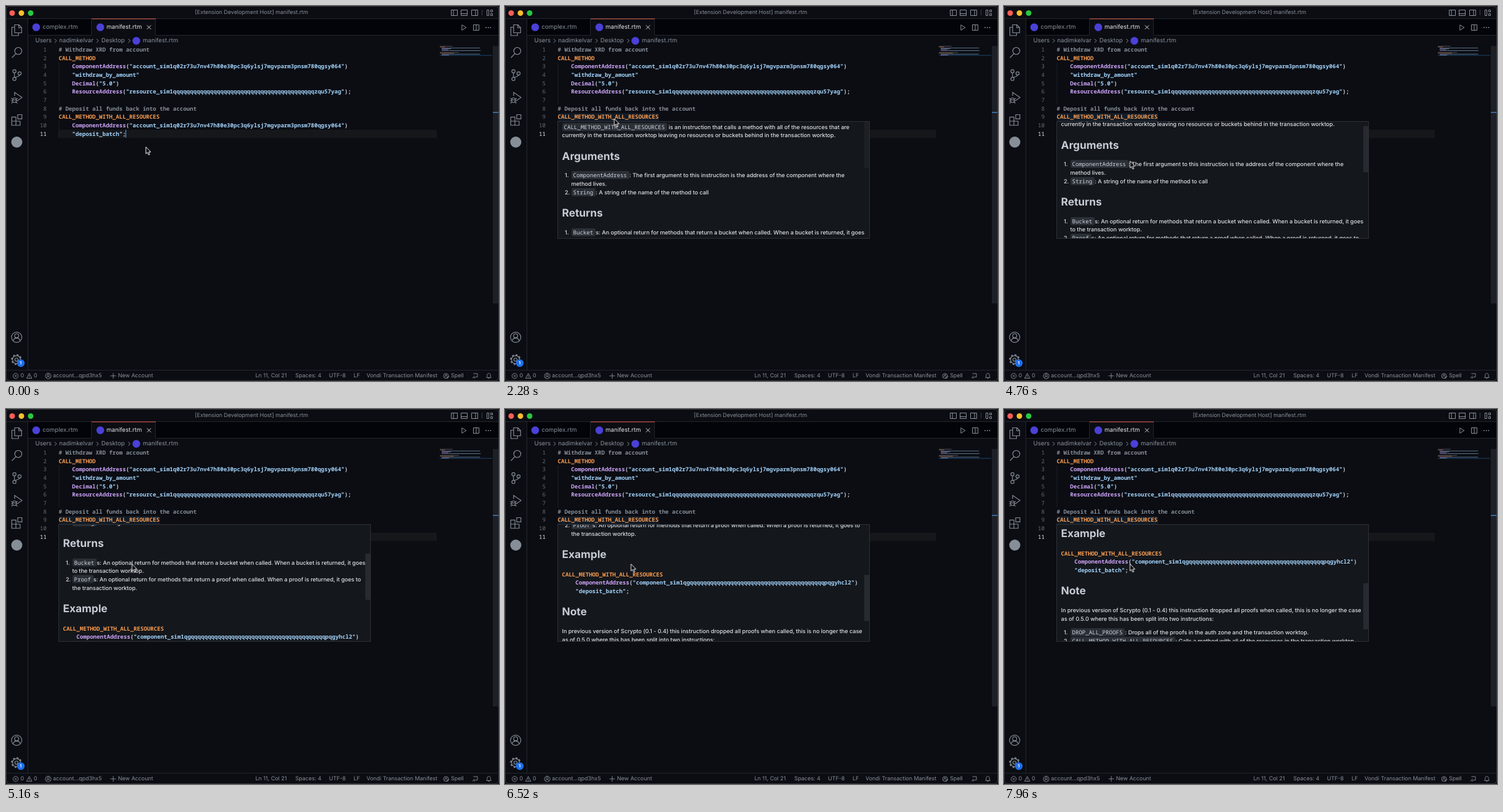
An HTML page that plays this animation: 800 by 609 pixels, repeating every 8000 ms.

```html
<!DOCTYPE html>
<html lang="en">
<head>
<meta charset="utf-8">
<title>Editor hover</title>
<style>
html, body { margin: 0; width: 100%; height: 100%; overflow: hidden; background: #0b0d13; }
#stage { position: relative; width: 800px; height: 609px; overflow: hidden; background: #0b0d13; text-rendering: geometricPrecision; -webkit-font-smoothing: antialiased; }
#stage::after { content: ""; position: absolute; inset: 0; border-radius: 6px; box-shadow: inset 0 0 0 1px #34373d; }
svg { position: absolute; left: 0; top: 0; overflow: visible; }
.t { position: absolute; white-space: pre; font: 8.95px/14px Inter, sans-serif; color: #8a919b; }
.nav { font-size: 9.7px; }
.on { color: #e3e7ec; }
.mono, code { font: 600 9.1px/14px "Noto Sans Mono", monospace; color: #ced5dd; }
.num { font-weight: 500; color: #626973; }
.num.on { color: #dfe4ea; }
.doc { font-size: 9.1px; font-weight: 450; letter-spacing: -.035px; color: #dde2e7; }
.head { font-size: 17.3px; font-weight: 700; color: #c6ccd4; }
code { font-weight: 500; background: #2b2f36; border-radius: 2.5px; padding: 0 4px 0 3px; letter-spacing: 0; line-height: 1; }
#tip { position: absolute; left: 85px; top: 187px; width: 505px; height: 189px; border: 1px solid #2d3138; background: #14171c; overflow: hidden; visibility: hidden; }
#doc { position: absolute; left: -86px; top: -188px; }
#thumb { position: absolute; right: 0; top: 0; width: 8px; height: 75px; background: #272b31; }
#caret { position: absolute; left: 194px; top: 201px; width: 1.3px; height: 13px; background: #58a6ff; }
#word { position: absolute; left: 85.5px; top: 173.5px; width: 164px; height: 13.5px; background: #121c28; visibility: hidden; }
</style>
</head>
<body>
<div id="stage">
  <svg width="800" height="609" fill="none">
    <path fill="#020409" d="M36 21H800V47H36Z"/>
    <path fill="#0b0d13" d="M139 21H243V48H139Z"/>
    <path stroke="#22262d" d="M0 20.5H800M35.5 21V591M36 47.5H139M243 47.5H800M138.5 21V47M242.5 21V47M0 591.5H800"/>
    <path stroke="#e8604f" d="M139 20.9H243"/>
    <path fill="#15171b" d="M85 201H699V214.5H85Z"/>
    <path stroke="#1d2128" d="M86 92V160M86 187V214"/>
    <path fill="#1d2026" d="M790 65H800V483H790Z"/>
    <path stroke="#4487c4" stroke-width="1.4" d="M790 172.8H800"/>
    <path fill="#17324f" d="M704 79.4H789V80.9H704Z"/>
    <g id="map" opacity=".55"></g>

    <circle cx="10" cy="11.5" r="4.5" fill="#fe5f57"/>
    <circle cx="25" cy="11.5" r="4.5" fill="#febc2e"/>
    <circle cx="40" cy="11.5" r="4.5" fill="#28c840"/>
    <g fill="#4b40d8"><circle cx="49" cy="34.5" r="6.3"/><circle cx="153" cy="34.5" r="6.3"/><circle cx="211.5" cy="56.5" r="6.3"/></g>

    <g stroke="#868e98" stroke-width="1.15">
      <path d="M14 30.5H21L25.3 35V43.5H14ZM20.7 30.5V35.2H25.3M14 34.5H9.5V48H20.3V43.5"/>
      <path d="M16 77.3L9.7 84M25.6 73A5.7 5.7 0 1 0 14.2 73A5.7 5.7 0 1 0 25.6 73"/>
      <g><circle cx="13.7" cy="106" r="2.6"/><circle cx="13.7" cy="118.4" r="2.6"/><circle cx="22" cy="109.5" r="2.6"/><path d="M13.7 108.6V115.8M22 112.1C22 115 18 114.6 15 116"/></g>
      <path d="M14 146V140.3L26 148.6L18.5 153.8M10.6 153A3 3.6 0 1 0 16.8 153A3 3.6 0 1 0 10.6 153M10.6 152.5H16.8M8.5 150L11 151.3M19 150L16.4 151.3M8.2 154H10.6M16.8 154H19.2M9 158L11.2 155.8M18.4 158L16.2 155.8"/>
      <path d="M9.3 180.3H16.1V193.7H9.3ZM9.3 187H22.9V193.7H16.1M19 176.5H25.8V183.3H19Z"/>
      <circle cx="17.3" cy="538" r="8.4"/><circle cx="17.3" cy="535.5" r="3.3"/><path d="M11.6 544C12.5 537.8 22.1 537.8 23 544"/>
      <circle cx="17" cy="574.3" r="6.4"/><circle cx="17" cy="574.3" r="2.6"/><circle cx="17" cy="574.3" r="7.8" stroke-width="1.8" stroke-dasharray="3.1 3.026"/>
    </g>
    <circle cx="17.5" cy="221" r="9" fill="#868e98"/>
    <circle cx="24" cy="580" r="6.2" fill="#1f6feb"/>

    <g stroke="#8a919b">
      <path d="M722.5 6.5H732.5V15.5H722.5ZM726 6.5V15.5M738.5 6.5H748.5V15.5H738.5ZM738.5 12.5H748.5M755.5 6.5H765.5V15.5H755.5ZM762 6.5V15.5M780.5 6.5H783.5V15.5H780.5ZM786.5 6.5H789.5V9.5H786.5ZM786.5 12.5H789.5V15.5H786.5Z"/>
      <path stroke="#3a3f47" d="M772.5 6V15"/>
      <path d="M739.8 30.7V39.3L746.8 35ZM758.5 30.5H767.5V39.5H758.5ZM763 30.5V39.5"/>
      <path stroke="#d5dae0" d="M228.8 31.3L235.2 37.7M235.2 31.3L228.8 37.7"/>
      <path d="M79 53.5L82 56.5L79 59.5M147 53.5L150 56.5L147 59.5M198.5 53.5L201.5 56.5L198.5 59.5"/>
      <g stroke-width=".9">
        <circle cx="15.7" cy="600.8" r="4.2"/><path d="M14 599.1L17.4 602.5M17.4 599.1L14 602.5"/>
        <path d="M37.7 596.6L42 604.6H33.4ZM37.7 599.5V602M37.7 602.8V603.6"/>
        <circle cx="68.5" cy="600.8" r="4.6"/><circle cx="68.5" cy="599.5" r="1.8"/><path d="M65.4 604C66 600.9 71 600.9 71.6 604M169.5 600.7H178.5M174 596.2V605.2"/>
        <circle cx="714" cy="600.8" r="3.9"/><path d="M712 602.5L714 598.5L716 602.5M715 603L716.5 604.6L719 601"/>
        <path d="M758.5 597H765V602.5H762L760 604.5V602.5M757 604.5L760.5 600.5"/>
        <path d="M779.8 603.4H787.2L786.2 601.5V599.5C786.2 595.6 780.8 595.6 780.8 599.5V601.5ZM782.3 603.6C782.5 605.4 784.5 605.4 784.7 603.6"/>
      </g>
    </g>
    <g fill="#8a919b"><circle cx="779" cy="35" r=".9"/><circle cx="782.7" cy="35" r=".9"/><circle cx="786.4" cy="35" r=".9"/></g>
  </svg>
  <div id="word"></div>
  <div id="text"></div>
  <div id="caret"></div>
  <div id="tip"><div id="doc"></div><div id="thumb"></div></div>
  <svg id="pointer" width="10" height="15"><path d="M0 0V11.2L2.5 8.9L4.3 13L6.2 12.2L4.4 8.2H7.9Z" fill="#000" stroke="#fff" stroke-width="1"/></svg>
</div>
<script>
const $ = id => document.getElementById(id);
const LINE = 13.65, CHAR = 5.46, LOOP = 8000;
const COLORS = { comment: '#868d97', keyword: '#f99c50', type: '#cda4f8', string: '#a3d3fb', plain: '#ced5dd' };

const account = 'account_sim1q02r73u7nv47h80e30pc3q6ylsj7mgvparm3pnsm780qgsy064';
const source = [
  '# Withdraw XRD from account',
  'CALL_METHOD',
  `    ComponentAddress("${account}")`,
  '    "withdraw_by_amount"',
  '    Decimal("5.0")',
  `    ResourceAddress("resource_sim1${'q'.repeat(42)}zqu57yag");`,
  '',
  '# Deposit all funds back into the account',
  'CALL_METHOD_WITH_ALL_RESOURCES',
  `    ComponentAddress("${account}")`,
  '    "deposit_batch";'
];

function tokens(line) {
  const rule = /(?<comment>#.*)|(?<string>"[^"]*")|(?<keyword>[A-Z]+_[A-Z_]+)|(?<type>[A-Z]\w+)|(?<plain>[^"A-Z#]+)/g;
  return [...line.matchAll(rule)].map(m => ({
    text: m[0], at: m.index, color: COLORS[Object.keys(m.groups).find(k => m.groups[k])]
  }));
}
const paint = line => tokens(line).map(k => `<span style="color:${k.color}">${k.text}</span>`).join('');

// Places one line of text by its left edge and vertical middle.
function put(parent, x, middle, html, cls = '') {
  const el = document.createElement('div');
  el.className = 't ' + cls;
  el.style.left = x + 'px';
  el.style.top = middle - 7 + 'px';
  el.innerHTML = html;
  parent.append(el);
}

source.forEach((line, i) => {
  const y = 71 + LINE * i, n = String(i + 1);
  put($('text'), 66 - n.length * CHAR, y, n, 'mono num' + (i === 10 ? ' on' : ''));
  put($('text'), 85.5, y, paint(line), 'mono');
  $('map').innerHTML += tokens(line).filter(k => k.text.trim()).map(k =>
    `<rect x="${704 + k.at * .76}" y="${64.8 + i * 1.43}" width="${k.text.length * .76}" height=".95" fill="${k.color}"/>`).join('');
});

[
  [306.5, 10.8, '[Extension Development Host] manifest.rtm'],
  [59.5, 34.5, 'complex.rtm', 'nav'],
  [163, 34.5, 'manifest.rtm', 'nav on'],
  [47.5, 56.5, 'Users', 'nav'],
  [86.3, 56.5, 'nadimkelvar', 'nav'],
  [154.8, 56.5, 'Desktop', 'nav'],
  [222, 56.5, 'manifest.rtm', 'nav'],
  [23.5, 600.8, '0'],
  [45, 600.8, '0'],
  [76.3, 600.8, 'account...qpd3hx5'],
  [181.8, 600.8, 'New Account'],
  [404.7, 600.8, 'Ln 11, Col 21'],
  [469.5, 600.8, 'Spaces: 4'],
  [524, 600.8, 'UTF-8'],
  [564, 600.8, 'LF'],
  [585, 600.8, 'Vondi Transaction Manifest'],
  [722, 600.8, 'Spell'],
  [22.3, 580, '<b style="font-size:7px;color:#fff">1</b>']
].forEach(row => put($('text'), ...row));

const say = (x, y, html) => put($('doc'), x, y, html, 'doc');
const item = (n, y, html) => { say(97, y, n + '.'); say(107.5, y, html); };
const head = (y, text) => put($('doc'), 92.5, y, text, 'head');

say(92.5, 197.5, '<code>CALL_METHOD_WITH_ALL_RESOURCES</code> is an instruction that calls a method with all of the resources that are');
say(92.5, 211, 'currently in the transaction worktop leaving no resources or buckets behind in the transaction worktop.');
head(244.5, 'Arguments');
item(1, 276, '<code>ComponentAddress</code>: The first argument to this instruction is the address of the component where the');
say(107.5, 290, 'method lives.');
item(2, 303.5, '<code>String</code>: A string of the name of the method to call');
head(337, 'Returns');
item(1, 368.5, '<code>Bucket</code>s: An optional return for methods that return a bucket when called. When a bucket is returned, it goes');
say(107.5, 382, 'to the transaction worktop.');
item(2, 396, '<code>Proof</code>s: An optional return for methods that return a proof when called. When a proof is returned, it goes to');
say(107.5, 409.5, 'the transaction worktop.');
head(443, 'Example');
[
  'CALL_METHOD_WITH_ALL_RESOURCES',
  `    ComponentAddress("component_sim1qg${'q'.repeat(40)}pqgyhcl2")`,
  '    "deposit_batch";'
].forEach((line, i) => put($('doc'), 92.5, 474.6 + LINE * i, paint(line), 'mono'));
head(536, 'Note');
say(92.5, 568, 'In previous version of Scrypto (0.1 - 0.4) this instruction dropped all proofs when called, this is no longer the case');
say(92.5, 581.5, 'as of 0.5.0 where this has been split into two instructions:');
item(1, 604, '<code>DROP_ALL_PROOFS</code>: Drops all of the proofs in the auth zone and the transaction worktop.');
item(2, 617.6, '<code>CALL_METHOD_WITH_ALL_RESOURCES</code>: Calls a method with all of the resources in the transaction worktop.');

function play(el, steps, easing, duration = LOOP) {
  const frames = steps.map(([t, style]) => ({ offset: t / duration, easing, ...style }));
  frames.push({ ...frames[frames.length - 1], offset: 1 });
  el.animate(frames, { duration, iterations: Infinity });
}
const move = (x, y) => ({ transform: `translate(${x}px, ${y}px)` });
const show = v => ({ visibility: v ? 'visible' : 'hidden' });

play($('pointer'), [
  [0, move(227, 228.8)], [700, move(227, 228.8)], [1400, move(177.3, 183)],
  [2600, move(177.3, 183)], [3300, move(204.5, 251.8)]
], 'ease-in-out');
play($('caret'), [[0, { opacity: 1 }], [500, { opacity: 0 }]], 'steps(1, end)', 1000);
for (const id of ['tip', 'word']) play($(id), [[0, show(false)], [1720, show(true)]], 'steps(1, end)');

const scroll = [[0, 0], [4400, 0], [4740, 18], [4840, 18], [5450, 159], [5900, 159], [6400, 206], [7000, 206], [7600, 240]];
play($('doc'), scroll.map(([t, y]) => [t, move(0, -y)]), 'ease-out');
play($('thumb'), scroll.map(([t, y]) => [t, move(0, y * .395)]), 'ease-out');
// The scroll bar brightens once the pointer enters the panel.
play($('thumb'), [[0, { opacity: .45 }], [2800, { opacity: .45 }], [2900, { opacity: 1 }]], 'linear');
</script>
</body>
</html>
```
